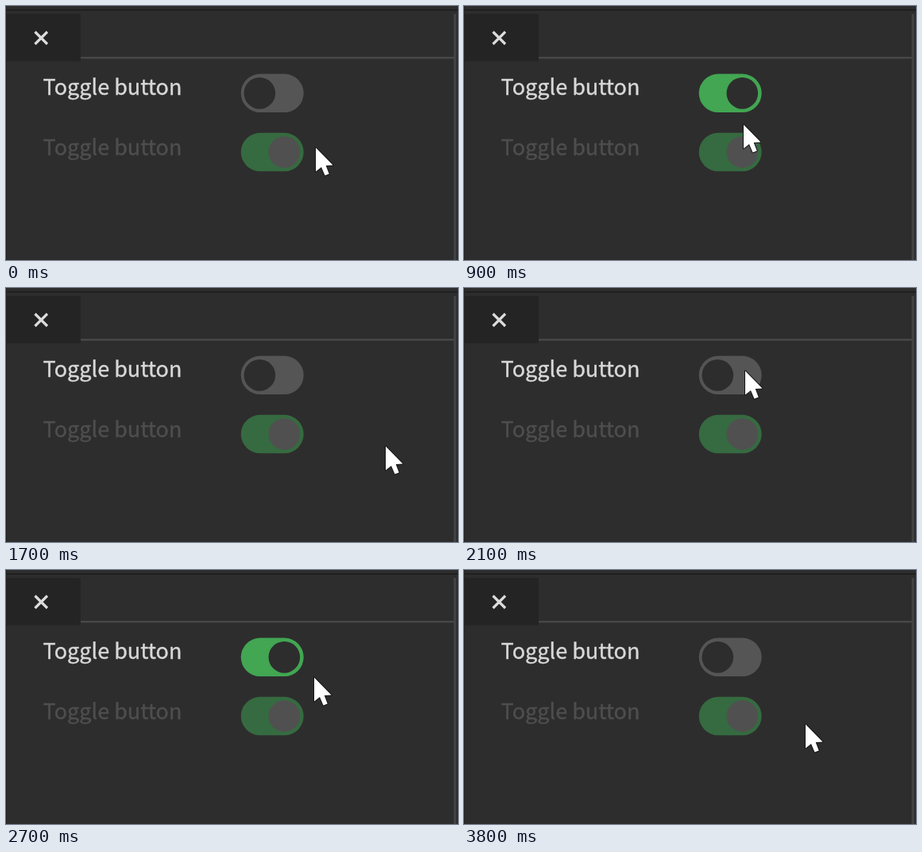
These frames come from a looping animation (569x320 px, 4600 ms). An HTML page with a canvas:

```html
<!DOCTYPE html>
<html lang="en">
<head>
<meta charset="utf-8">
<title>Toggle button</title>
<style>
  html, body { margin: 0; width: 100%; height: 100%; overflow: hidden; background: #2d2d2d; }
  canvas { display: block; width: 569px; height: 320px; filter: blur(0.55px); }
</style>
</head>
<body>
<canvas id="stage"></canvas>
<script>
const W = 569, H = 320, LOOP = 4600, STEP = 100;
const canvas = document.getElementById('stage');
const ctx = canvas.getContext('2d');
const ratio = window.devicePixelRatio || 1;
canvas.width = W * ratio;
canvas.height = H * ratio;
ctx.scale(ratio, ratio);

// Each eased move: when it starts and ends, and where the pointer arrives
const home = { x: 389, y: 177 };
const moves = [
  { from: 0, to: 500, x: 325, y: 100 },
  { from: 600, to: 800, x: 351, y: 148 },
  { from: 1000, to: 1300, x: 331, y: 124 },
  { from: 1400, to: 1700, x: 477, y: 198 },
  { from: 1700, to: 2100, x: 353, y: 103 },
  { from: 2200, to: 2500, x: 440, y: 161 },
  { from: 2500, to: 2700, x: 387, y: 134 },
  { from: 2700, to: 2900, x: 357, y: 112 },
  { from: 3000, to: 3200, x: 403, y: 162 },
  { from: 3200, to: 3300, x: 444, y: 211 },
  { from: 3500, to: 3800, x: 429, y: 193 }
];
const clicks = [400, 1400, 2200, 3000];
const arrow = new Path2D('M0 0V30L7 24.5L11.5 35L16.7 33L12.7 22.5L21.5 22Z');

function ease(k) {
  k = Math.min(1, Math.max(0, k));
  return k * k * (3 - 2 * k);
}

function pointerAt(t) {
  let { x, y } = home;
  for (const m of moves) {
    const k = ease((t - m.from) / (m.to - m.from));
    x += (m.x - x) * k;
    y += (m.y - y) * k;
  }
  return [x, y];
}

function rect(x, y, w, h, color) {
  ctx.fillStyle = color;
  ctx.fillRect(x, y, w, h);
}

function label(y, color) {
  ctx.font = '27px "Noto Sans CJK JP", "Noto Sans CJK SC", "Noto Sans CJK", "Noto Sans", sans-serif';
  ctx.fillStyle = ctx.strokeStyle = color;
  ctx.lineWidth = 0.4;
  ctx.fillText('Toggle button', 46.5, y);
  ctx.strokeText('Toggle button', 46.5, y);
}

function toggle(y, on, track, knob) {
  ctx.fillStyle = track;
  ctx.beginPath();
  ctx.roundRect(295.7, y, 79, 48.5, 24.25);
  ctx.fill();
  ctx.fillStyle = knob;
  ctx.beginPath();
  ctx.arc(on ? 350.3 : 319.3, y + 24.25, 19.8, 0, Math.PI * 2);
  ctx.fill();
}

function panel() {
  rect(0, 0, W, H, '#2d2d2d');
  rect(0, 4, W, 2, '#202020');
  rect(0, 10, 94, 59.5, '#242424');
  rect(94, 64, 470, 2.4, '#484848');
  rect(563.6, 10, 3, H - 10, '#444444');
  rect(0, 0, 1, H, '#202020');
  ctx.strokeStyle = '#dcdcdc';
  ctx.lineWidth = 3.2;
  ctx.beginPath();
  ctx.moveTo(36.5, 32.5);
  ctx.lineTo(52, 48);
  ctx.moveTo(52, 32.5);
  ctx.lineTo(36.5, 48);
  ctx.stroke();
}

function pointer(x, y) {
  ctx.save();
  ctx.translate(x + 1, y + 1.5);
  ctx.lineJoin = 'round';
  ctx.lineWidth = 2;
  ctx.strokeStyle = '#161616';
  ctx.stroke(arrow);
  ctx.fillStyle = '#fff';
  ctx.fill(arrow);
  ctx.restore();
}

function draw(now) {
  const t = Math.floor((now % LOOP) / STEP) * STEP;
  const on = clicks.filter(c => c <= t).length % 2 === 1;
  panel();
  label(112, '#d8d8d8');
  label(187.7, '#4e4e4e');
  toggle(85.6, on, on ? '#42a652' : '#555555', '#2d2d2d');
  toggle(159.8, true, '#366a40', '#505050');
  pointer(...pointerAt(t));
}

const start = performance.now();
function tick() {
  draw(performance.now() - start);
  requestAnimationFrame(tick);
}
tick();
</script>
</body>
</html>
```
